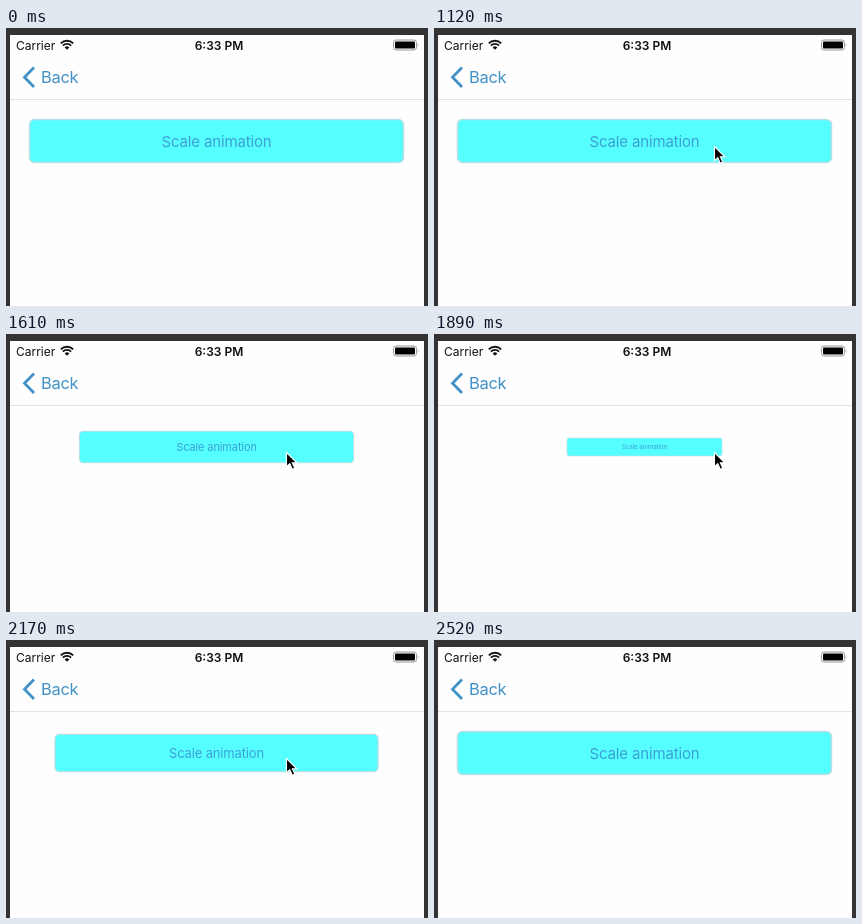
These frames come from a looping animation (422 px wide and 278 px high, 3290 ms). An HTML page:

```html
<!DOCTYPE html>
<html lang="en">
<head>
<meta charset="utf-8">
<style>
  html, body { margin: 0; width: 100%; height: 100%; overflow: hidden; background: #343233; }
  svg { display: block; width: 422px; height: 278px; font-family: Inter, sans-serif; }
</style>
</head>
<body>
<svg viewBox="0 0 422 278">
  <rect x="4" y="7" width="414" height="271" fill="#fefefe"/>
  <path d="M4 71.5H418" stroke="#e2e2e2"/>

  <g fill="#111" font-size="12">
    <text x="10" y="21.5">Carrier</text>
    <text x="213" y="21.5" text-anchor="middle" font-weight="600">6:33 PM</text>
    <path d="M61 21.8 58.7 19.4A3.3 3.3 0 0 1 63.3 19.4Z"/>
    <path d="M56.9 17.6A5.8 5.8 0 0 1 65.1 17.6M54.8 15.3A8.8 8.8 0 0 1 67.2 15.3" fill="none" stroke="#111" stroke-width="1.9"/>
    <rect x="387.5" y="12" width="23" height="10" rx="2.5" fill="none" stroke="#999"/>
    <rect x="389" y="13.5" width="20" height="7" rx="1" fill="#000"/>
    <path d="M411.8 15.2Q413.4 17 411.8 18.8Z" fill="#999"/>
  </g>

  <path d="M28 39.5 18.5 49.2 28 59" fill="none" stroke="#4292c8" stroke-width="2.8"/>
  <text x="35" y="55" font-size="16.5" letter-spacing="-.3" fill="#4292c8">Back</text>

  <g id="button">
    <rect x="-187" y="-21.5" width="374" height="43" rx="5" fill="#55ffff" stroke="#b9dfe5" stroke-width="1.5"/>
    <text y="5.5" font-size="15" letter-spacing="-.15" text-anchor="middle" fill="#3c9fd6">Scale animation</text>
  </g>

  <path id="cursor" d="M0 0V14.2L3.3 11.2 5.7 16.8 8.3 15.7 5.9 10.3H10.3Z" stroke="#fff" stroke-width="1.1"/>
</svg>
<script>
const LOOP = 3290, STEP = 70;
const button = document.getElementById('button');
const cursor = document.getElementById('cursor');

// Pointer stops: time, x, y
const path = [
  [350, 285, 221], [420, 290, 165], [490, 293, 130], [560, 294, 111],
  [630, 293.5, 103.5], [840, 288, 108], [980, 281, 117], [1120, 280.5, 118.5],
  [2310, 280.5, 118.5], [2380, 281, 147], [2450, 284, 202], [2520, 286, 260]
];

// Standard ease-in-out, cubic-bezier(.42, 0, .58, 1)
function ease(x) {
  x = Math.min(1, Math.max(0, x));
  let low = 0, high = 1;
  for (let i = 0; i < 24; i++) {
    const s = (low + high) / 2;
    const bx = 1.26 * s * (1 - s) ** 2 + 1.74 * s * s * (1 - s) + s ** 3;
    if (bx < x) low = s; else high = s;
  }
  return low * low * (3 - 2 * low);
}

function scaleAt(t) {
  return t < 1850 ? 1 - 0.6 * ease((t - 1376) / 500)
                  : 0.4 + 0.6 * ease((t - 1835) / 500);
}

function draw(now) {
  const t = Math.floor(now % LOOP / STEP) * STEP;
  button.setAttribute('transform', `translate(210.5 113) scale(${scaleAt(t)})`);

  const next = path.findIndex(p => p[0] > t);
  cursor.style.display = next > 0 ? '' : 'none';
  if (next > 0) {
    const [t0, x0, y0] = path[next - 1], [t1, x1, y1] = path[next];
    const k = (t - t0) / (t1 - t0);
    cursor.setAttribute('transform', `translate(${x0 + (x1 - x0) * k} ${y0 + (y1 - y0) * k})`);
  }
  requestAnimationFrame(draw);
}
draw(performance.now());
</script>
</body>
</html>
```
